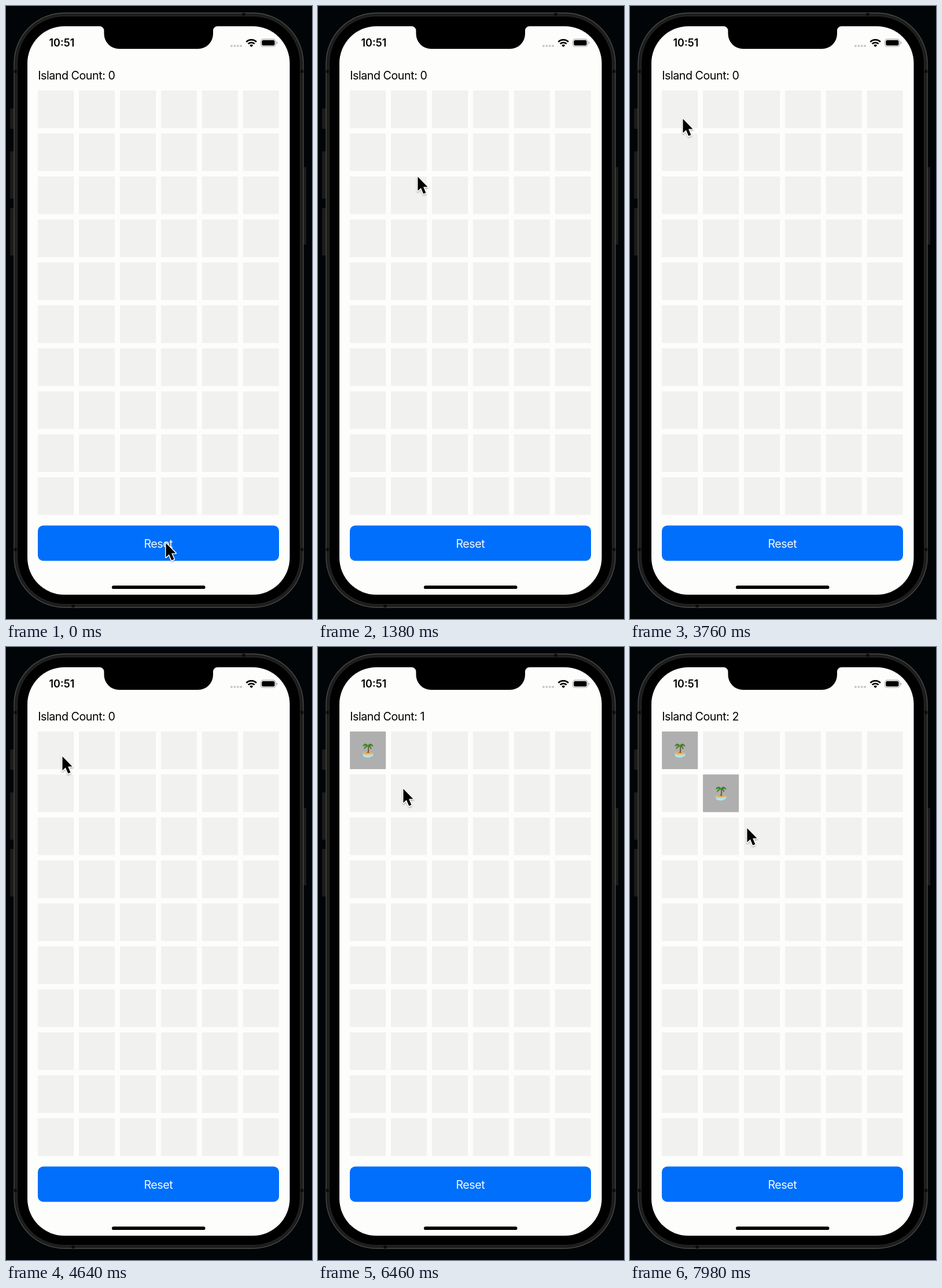
An HTML page that plays this animation: 529x1059 px, repeating every 8000 ms.

```html
<!DOCTYPE html>
<html lang="en">
<head>
<meta charset="utf-8">
<title>Island Count</title>
<style>
  html, body { margin: 0; width: 100%; height: 100%; overflow: hidden; background: #020508; }
  svg { display: block; width: 100vw; height: 100vh; }
  text { font-family: Inter, "Liberation Sans", sans-serif; font-size: 19.75px; letter-spacing: -.5px; white-space: pre; }
  .time { font-size: 18px; font-weight: 600; letter-spacing: 0; }
</style>
</head>
<body>
<svg viewBox="0 0 529 1059" xmlns="http://www.w3.org/2000/svg">
  <defs>
    <g id="island">
      <path d="M-10.5 7C-8 4.5 8 4.5 10.5 7C11 10-5 15-9 10Z" fill="#64c9dc"/>
      <path d="M-8 11C-3 14 6 14 10 8L8 7L-9 8Z" fill="#a7e9ee"/>
      <path d="M-10 6.5C-6 2 5 2 10 6.2C6 9.5-6 9.5-10 6.5Z" fill="#efbd78"/>
      <path d="M-7 5.5C-3 3 4 3 7 5.5Z" fill="#d58d48"/>
      <path d="M-1 5C.3 1 .4-3-.3-7L1.4-7C2.4-3 2.2 1 1.6 5Z" fill="#805333"/>
      <path d="M0-8C-3-13-8-11-9-6C-6-8-4-8-3-7C-6-6-7-4-6.5-1C-4-4-2-5 0-6.5C2-5 4-4 5.5-1C7-4 5-6 4-7C6-8 8-7 9.5-5C9-11 4-13 0-8Z" fill="#397b2d"/>
      <path d="M-7-9C-4-11-2-10 0-8C2-11 5-11 7-9M0-8L-5-4M0-8L5-4" fill="none" stroke="#609b36" stroke-width="1"/>
    </g>
    <filter id="shadow" x="-50%" y="-50%" width="200%" height="200%">
      <feDropShadow dx="0" dy="1.5" stdDeviation="1.3" flood-color="#000" flood-opacity=".32"/>
    </filter>
  </defs>

  <rect width="529" height="1059" fill="#020508"/>
  <g fill="#1b1b1a">
    <rect x="7" y="177" width="8" height="35" rx="1.5"/>
    <rect x="7" y="251" width="8" height="82" rx="1.5"/>
    <rect x="7" y="349" width="8" height="82" rx="1.5"/>
    <rect x="513" y="278" width="6" height="134" rx="1.5"/>
  </g>
  <rect x="14" y="12" width="500" height="1027" rx="87" fill="#1d1d1b" stroke="#4c4c49" stroke-width="1.3"/>
  <path d="M14 113H20M508 113H514M14 939H20M508 939H514M411 12V18M116 1033V1039" stroke="#0b0b0a" stroke-width="5"/>
  <rect x="19.5" y="17.5" width="489" height="1016" rx="81" fill="#000" stroke="#30302e" stroke-width=".8"/>
  <rect x="37" y="35" width="453.5" height="982" rx="64" fill="#fdfdfc"/>
  <path d="M162 34V35A7.5 7.5 0 0 1 169.5 42.5V48A26 26 0 0 0 195.5 74H332A26 26 0 0 0 358 48V42.5A7.5 7.5 0 0 1 365.5 35V34Z"/>

  <text class="time" x="74.5" y="70">10:51</text>
  <g fill="#c9c9ca">
    <circle cx="390" cy="69" r="2"/><circle cx="395.4" cy="69" r="2"/>
    <circle cx="400.8" cy="69" r="2"/><circle cx="406.2" cy="69" r="2"/>
  </g>
  <g fill="none" stroke="#000" stroke-width="2.7">
    <path d="M415.5 62A12.2 12.2 0 0 1 432.9 62"/>
    <path d="M418.7 65.4A7.7 7.7 0 0 1 429.7 65.4"/>
  </g>
  <path d="M421.2 68A4.3 4.3 0 0 1 427.2 68L424.2 71Z"/>
  <rect x="440.6" y="57.4" width="25.6" height="12.6" rx="4" fill="none" stroke="#a3a3a5" stroke-width="1.1"/>
  <rect x="442.3" y="59.1" width="22.2" height="9.2" rx="2.5"/>
  <path d="M467.6 61.6Q469.4 62.1 469.4 63.7T467.6 65.8Z" fill="#a3a3a5"/>

  <text id="count" x="55.2" y="127"></text>
  <g id="cells"></g>
  <rect x="55" y="897.5" width="417" height="61" rx="9.5" fill="#006ffb"/>
  <text x="263.3" y="935.5" text-anchor="middle" fill="#f4f8ff">Reset</text>
  <rect x="183" y="1001.3" width="161.5" height="5.8" rx="2.9"/>
  <g id="cursor" filter="url(#shadow)">
    <path d="M0 0V24.3L5.4 19.2L9.8 29.6L14 27.8L9.6 17.6H17Z" stroke="#fff" stroke-width="3" stroke-linejoin="round" paint-order="stroke"/>
  </g>
</svg>
<script>
const LOOP = 8000;
const NS = "http://www.w3.org/2000/svg";
const COLS = 6, ROWS = 10;
const count = document.getElementById("count");
const cells = document.getElementById("cells");
const cursor = document.getElementById("cursor");

// Cursor stops: time, x, y
const path = [
  [0, 276.5, 928], [180, 276.5, 928], [1380, 172.5, 295], [1600, 170.5, 293],
  [2680, 123.5, 268], [3760, 91.5, 195], [4500, 97.5, 189], [5700, 97.5, 189],
  [6460, 147.5, 245], [6750, 160, 257], [7250, 160, 257], [7900, 202.5, 313], [LOOP, 202.5, 313]
];
const taps = [{ at: 4700, col: 0, row: 0 }, { at: 6960, col: 1, row: 1 }];

function add(parent, name, attrs) {
  const node = document.createElementNS(NS, name);
  for (const key in attrs) node.setAttribute(key, attrs[key]);
  return parent.appendChild(node);
}

const cellX = col => 55.2 + col * 70.9;
const cellY = row => 146 + row * 74.25;
const addCell = (parent, col, row, fill) =>
  add(parent, "rect", { x: cellX(col), y: cellY(row), width: 62, height: 65, fill });

for (let row = 0; row < ROWS; row++)
  for (let col = 0; col < COLS; col++) addCell(cells, col, row, "#f1f1ef");

for (const tap of taps) {
  tap.node = add(cells, "g", {});
  addCell(tap.node, tap.col, tap.row, "#afafaf");
  add(tap.node, "use", { href: "#island", x: cellX(tap.col) + 31, y: cellY(tap.row) + 32 });
}

function cursorAt(time) {
  const i = path.findIndex(stop => stop[0] > time);
  const [t0, x0, y0] = path[i - 1], [t1, x1, y1] = path[i];
  const u = (time - t0) / (t1 - t0);
  const ease = u * u * (3 - 2 * u);
  return [x0 + (x1 - x0) * ease, y0 + (y1 - y0) * ease];
}

function draw(time) {
  let islands = 0;
  for (const tap of taps) {
    const shown = time >= tap.at;
    tap.node.setAttribute("visibility", shown ? "visible" : "hidden");
    islands += shown;
  }
  count.textContent = `Island Count: ${islands}`;
  cursor.setAttribute("transform", `translate(${cursorAt(time)})`);
}

let start;
function tick(now) {
  start ??= now;
  draw((now - start) % LOOP);
  requestAnimationFrame(tick);
}
draw(0);
requestAnimationFrame(tick);
</script>
</body>
</html>
```
